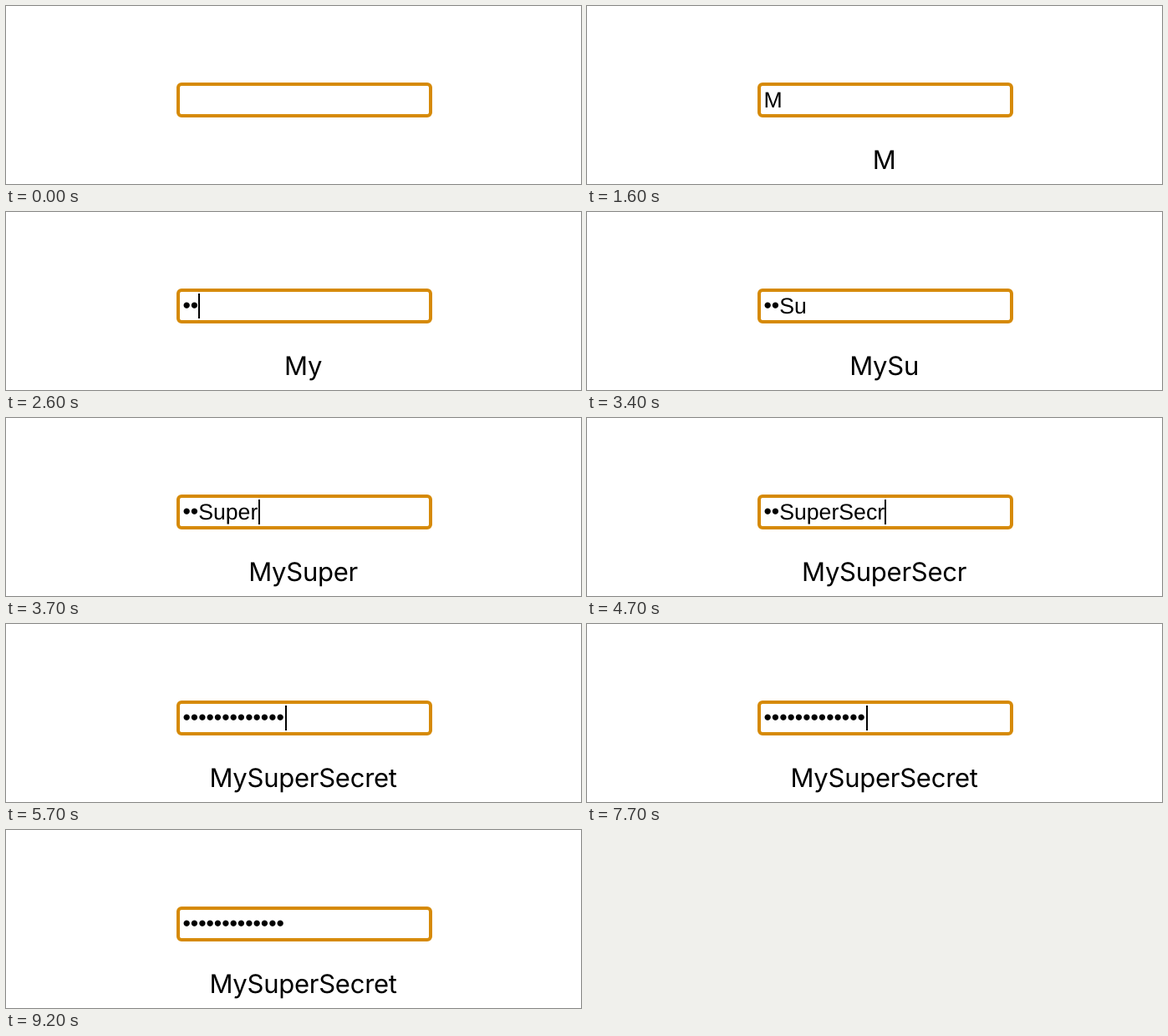
Write an HTML page that moves like this. It is 688x214 px and loops after 9.5 s.

```html
<!DOCTYPE html>
<html lang="en">
<head>
<meta charset="utf-8">
<title>Password field</title>
<style>
  html, body { margin: 0; width: 100%; height: 100%; overflow: hidden; background: #fff; }
  svg { display: block; }
  text { fill: #000; text-rendering: geometricPrecision; }
  #field { font: 26.667px "Liberation Sans", Arial, sans-serif; font-kerning: none; }
  #plain {
    font: 31px Inter, sans-serif;
    font-optical-sizing: none;
    letter-spacing: -0.008em;
    text-anchor: middle;
  }
</style>
</head>
<body>
<svg width="688" height="214" viewBox="0 0 688 214">
  <rect x="206" y="94" width="302" height="38" rx="4" fill="#fff" stroke="#d68a08" stroke-width="4"/>
  <text id="field" x="211.5"><tspan id="mask" y="121.3"></tspan><tspan id="clear" y="122"></tspan></text>
  <rect id="caret" y="98" width="2" height="30"/>
  <text id="plain" x="355.6" y="196"></text>
</svg>
<script>
  const LOOP = 9500;
  const FOCUS = 300;
  const BLINK = 500;
  const MASK_DELAY = 800;
  const CARET_START = 212;

  const bursts = [
    { text: "My", start: 1100, gap: 700 },
    { text: "Su", start: 2700, gap: 200 },
    { text: "per", start: 3500, gap: 100 },
    { text: "Sec", start: 4100, gap: 200 },
    { text: "ret", start: 4700, gap: 100 }
  ];
  const word = bursts.map(({ text }) => text).join("");
  const keyTimes = bursts.flatMap(({ text, start, gap }) => [...text].map((_, i) => start + i * gap));

  const [field, mask, clear, caret, plain] =
    ["field", "mask", "clear", "caret", "plain"].map(id => document.getElementById(id));

  // A pause in typing masks everything typed so far.
  function stateAt(time) {
    const keys = keyTimes.filter(key => key <= time);
    const typed = keys.length;
    const masked = keys.findLastIndex((key, i) => (keys[i + 1] ?? time) - key >= MASK_DELAY) + 1;
    const lastKey = keys[typed - 1] ?? FOCUS;
    const changed = typed && masked === typed ? lastKey + MASK_DELAY : lastKey;
    return { typed, masked, changed };
  }

  function draw(time) {
    const { typed, masked, changed } = stateAt(time);
    mask.textContent = "•".repeat(masked);
    clear.textContent = word.slice(masked, typed);
    plain.textContent = word.slice(0, typed);

    const end = CARET_START + (typed ? field.getComputedTextLength() : 0);
    const since = time - changed;
    const lit = since >= 0 && since % (2 * BLINK) < BLINK;
    caret.setAttribute("x", 2 * Math.round(end / 2));
    caret.setAttribute("visibility", lit ? "visible" : "hidden");
  }

  const begin = performance.now();
  function tick() {
    draw((performance.now() - begin) % LOOP);
    requestAnimationFrame(tick);
  }
  tick();
</script>
</body>
</html>
```
